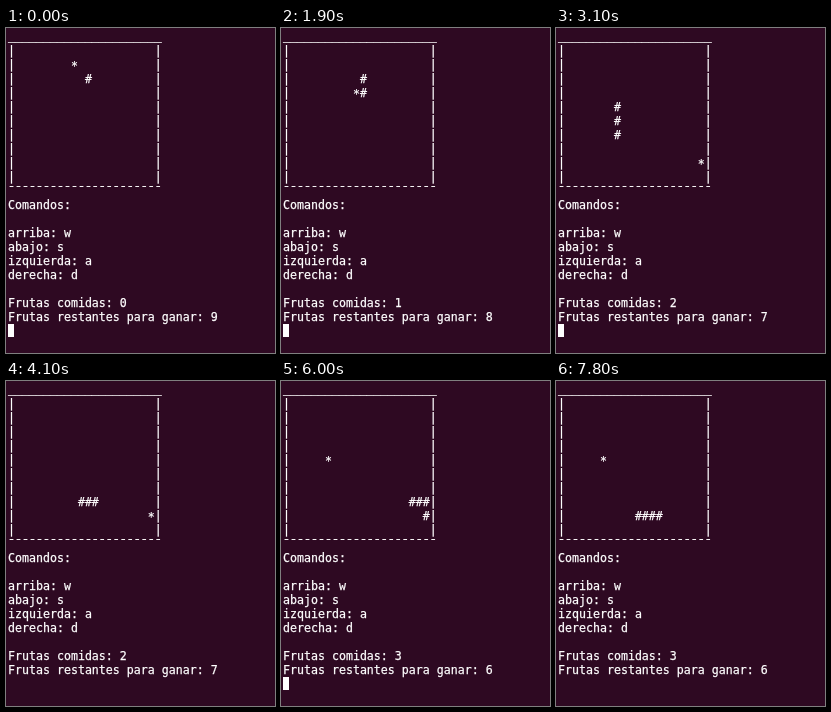
An HTML page for the animation above (8000 ms loop, 269 by 325 pixels).

```html
<!DOCTYPE html>
<html lang="es">
<head>
<meta charset="utf-8">
<title>Serpiente</title>
<style>
  html, body { margin: 0; width: 100%; height: 100%; overflow: hidden; background: #2e0922; }
  pre {
    position: absolute; left: 2px; top: 2px; margin: 0;
    font: 11.627px/14px "DejaVu Sans Mono", monospace;
    font-variant-ligatures: none;
    color: #fff; -webkit-text-stroke: .25px #fff;
  }
  .top, .fruit { position: relative; }
  .top { top: -1px; }
  .fruit { top: 1px; }
  #cursor { position: absolute; left: 2px; top: 296px; width: 6px; height: 13px; background: #fff; }
</style>
</head>
<body>
<pre id="screen"></pre>
<div id="cursor"></div>
<script>
const LOOP = 8000, COLS = 20, ROWS = 10, GOAL = 9;
const FRAME = 100, TICK = 205.5, LEAD = 35; // ms: display refresh, game step, head start
const BLINK = 600, KEY_LEAD = 131;          // ms: half a blink, key press before its turn
const screen = document.getElementById('screen');
const cursor = document.getElementById('cursor');

const dirs = { L: [-1, 0], R: [1, 0], U: [0, -1], D: [0, 1] };
const fruits = [[9, 1], [10, 3], [20, 8], [6, 4]];
const route = [[11, 2]]; // one cell per move
const meals = [];        // moves on which a fruit is eaten
const keys = [0];        // times of key presses; each restarts the blink

for (const leg of 'L3 U1 R3 D2 L3 D4 R12 D1 L9'.split(' ')) {
  const [dx, dy] = dirs[leg[0]];
  if (route.length > 1) keys.push(route.length * TICK - LEAD - KEY_LEAD);
  for (let n = +leg.slice(1); n > 0; n--) {
    const [x, y] = route.at(-1);
    const [fx, fy] = fruits[meals.length];
    route.push([x + dx, y + dy]);
    if (x + dx === fx && y + dy === fy) meals.push(route.length - 1);
  }
}

function render(moves) {
  const eaten = meals.filter(m => m <= moves).length;
  const grid = Array.from({ length: ROWS }, () => ['|', ...Array(COLS).fill(' '), '|']);
  const [fx, fy] = fruits[eaten];
  grid[fy][fx] = '<span class="fruit">*</span>';
  for (const [x, y] of route.slice(Math.max(0, moves - eaten), moves + 1)) grid[y][x] = '#';
  screen.innerHTML = [
    `<span class="top">${'_'.repeat(COLS + 2)}</span>`,
    ...grid.map(row => row.join('')),
    '¯'.repeat(COLS + 2),
    'Comandos:', '',
    'arriba: w', 'abajo: s', 'izquierda: a', 'derecha: d', '',
    `Frutas comidas: ${eaten}`,
    `Frutas restantes para ganar: ${GOAL - eaten}`
  ].join('\n');
}

let shown = -1;
const begin = performance.now();
function tick() {
  const t = Math.floor((performance.now() - begin) % LOOP / FRAME) * FRAME;
  const moves = Math.floor((t + LEAD) / TICK);
  if (moves !== shown) render(shown = moves);
  const sinceKey = t - keys.findLast(k => k <= t);
  cursor.hidden = sinceKey % (2 * BLINK) >= BLINK;
  requestAnimationFrame(tick);
}
tick();
</script>
</body>
</html>
```
